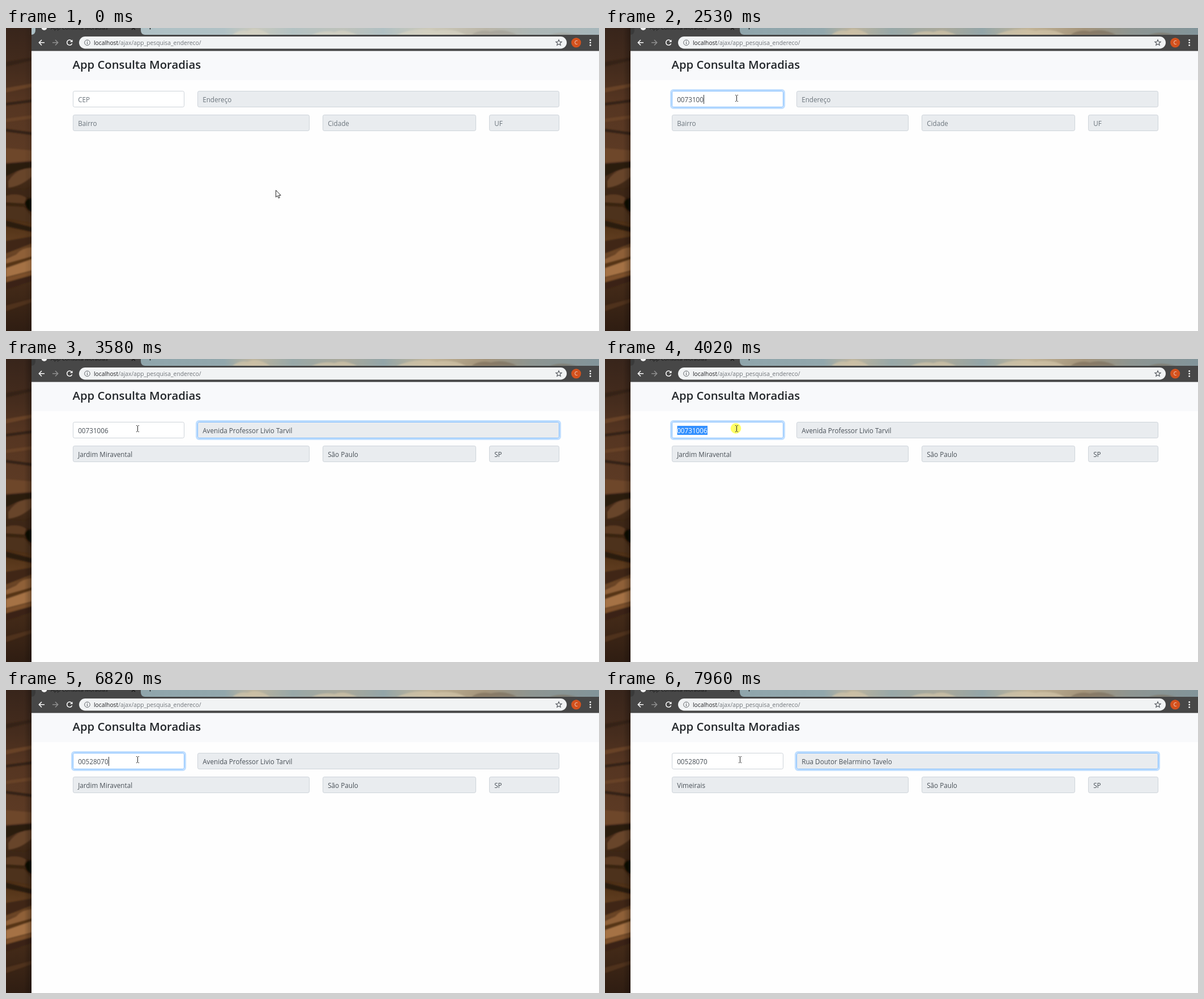
Animation of 1047x535 px, one loop 7990 ms. Source, as an HTML page:

```html
<!DOCTYPE html>
<html lang="pt-BR">
<head>
<meta charset="utf-8">
<title>App Consulta Moradias</title>
<style>
  html, body { margin: 0; width: 100%; height: 100%; overflow: hidden; background: #fefefe; }
  svg { display: block; width: 1047px; height: 535px; }
  text { font-family: "Open Sans", "Noto Sans", sans-serif; white-space: pre; }
  .field { font-size: 11.7px; fill: #495057; }
  .field.hint { fill: #6c757d; }
  .field.picked { fill: #fff; }
  .box { stroke-width: 1; }
  .ring { fill: none; stroke: #007bff; stroke-width: 3; }
</style>
</head>
<body>
<svg viewBox="0 0 1047 535">
  <defs>
    <linearGradient id="rock" x2="0" y2="1">
      <stop offset="0" stop-color="#38251b"/>
      <stop offset=".14" stop-color="#452c1d"/>
      <stop offset=".24" stop-color="#553521"/>
      <stop offset=".4" stop-color="#5c3a24"/>
      <stop offset=".48" stop-color="#4b2f1c"/>
      <stop offset=".57" stop-color="#35210f"/>
      <stop offset=".66" stop-color="#553519"/>
      <stop offset=".74" stop-color="#6b4526"/>
      <stop offset=".85" stop-color="#432a18"/>
      <stop offset="1" stop-color="#2f1d12"/>
    </linearGradient>
    <linearGradient id="sky">
      <stop offset="0" stop-color="#8ca3ab"/>
      <stop offset=".34" stop-color="#92a7ac"/>
      <stop offset=".39" stop-color="#bdb39c"/>
      <stop offset=".46" stop-color="#98a8a8"/>
      <stop offset=".55" stop-color="#aaa899"/>
      <stop offset=".62" stop-color="#93a5a8"/>
      <stop offset=".7" stop-color="#c2b497"/>
      <stop offset=".8" stop-color="#a3937a"/>
      <stop offset=".88" stop-color="#8e9591"/>
      <stop offset="1" stop-color="#82949a"/>
    </linearGradient>
    <linearGradient id="shade">
      <stop offset="0" stop-opacity="0"/>
      <stop offset="1" stop-opacity=".3"/>
    </linearGradient>
    <filter id="soft" x="-20%" width="140%"><feGaussianBlur stdDeviation="1.200"/></filter>
  </defs>

  <!-- desktop -->
  <rect width="46" height="535" fill="url(#rock)"/>
  <g filter="url(#soft)">
    <path d="M0 60L46 52V57L0 68ZM0 132L46 126V131L0 137ZM0 178L46 184V189L0 183Z" fill="#362216"/>
    <path d="M0 106L46 98V104L0 114ZM0 160L46 154V160L0 166Z" fill="#684228"/>
    <path d="M0 212L46 216V234L0 238Z" fill="#6e472b"/>
    <path d="M0 240L46 236V246L20 252L0 262Z" fill="#2c1a10"/>
    <path d="M4 270Q20 246 46 248V262Q26 280 4 282Z" fill="#67452c"/>
    <path d="M0 284L34 286L46 280V298L22 300L0 292Z" fill="#3c2516"/>
    <path d="M0 296Q22 290 36 300L32 310L0 308Z" fill="#5b3b23"/>
    <path d="M34 308Q38 300 46 302V324Q36 322 34 308Z" fill="#0c0705"/>
    <path d="M0 314L32 316L46 334V344L0 336Z" fill="#4d301b"/>
    <path d="M0 340L46 352V360L0 350Z" fill="#2b1a0e"/>
    <path d="M0 376L46 368V380L0 398Z" fill="#402815"/>
    <path d="M0 408L18 400Q28 388 46 387V404L0 416Z" fill="#8f6139"/>
    <path d="M0 416L46 403V408L0 423Z" fill="#573619"/>
    <path d="M0 424L46 408V428L0 440Z" fill="#a57244"/>
    <path d="M0 441L46 429V436L0 449Z" fill="#7b502b"/>
    <path d="M0 450L46 437V447L0 462Z" fill="#3a2413"/>
    <path d="M0 490L46 478V484L0 500Z" fill="#50331e"/>
  </g>
  <rect id="shadow" x="32" width="14" height="535" fill="url(#shade)"/>
  <rect x="45" width="1002" height="14" fill="url(#sky)"/>
  <g filter="url(#soft)">
    <path d="M400 12Q412 2 426 5Q446 -3 466 12ZM540 12Q560 3 580 7Q596 0 620 12ZM690 12Q720 -2 760 5Q790 0 812 12Z" fill="#d2c5a9" opacity=".7"/>
    <path d="M822 12Q836 2 856 6Q880 0 902 12ZM960 12Q980 5 1008 12Z" fill="#786b59" opacity=".6"/>
  </g>
  <rect id="pale" x="45" width="1002" height="14" fill="#dce8ec"/>

  <!-- browser -->
  <path id="corner" d="M45 0H54V12H45Z" fill="#3a3a3a"/>
  <path d="M45 12Q52 11 52 4V0H238V4Q238 11 245 12H1047V41H45Z" fill="#474747"/>
  <circle cx="67.500" cy="-1" r="5" fill="#f2f2f2"/>
  <text x="79" y="2.500" font-size="9.300" fill="#191919">App Consulta Moradias</text>
  <path d="M222 -3L228 3M228 -3L222 3M254.500 -3V2.500" stroke="#161616" stroke-width="1.400"/>
  <g fill="none" stroke="#fff" stroke-width="1.500">
    <path d="M68 25.800H58.500M63 21L58.300 25.800L63 30.600"/>
    <path d="M82 25.800H91.500M87 21L91.700 25.800L87 30.600" stroke="#8f8f8f"/>
    <path d="M116 23A4.600 4.600 0 1 0 116.600 27.200"/>
    <path d="M117.500 20.500V25H113Z" fill="#fff" stroke="none"/>
  </g>
  <rect x="129" y="15" width="861" height="21.500" rx="10.750" fill="#f1f3f4"/>
  <circle cx="143.500" cy="25.800" r="4.800" fill="none" stroke="#5f6368"/>
  <path d="M143.500 25V28.500M143.500 22.800V24" stroke="#5f6368" stroke-width="1.200"/>
  <text x="155" y="29.700" font-size="10.300" fill="#202124">localhost<tspan fill="#70757a">/ajax/app_pesquisa_endereco/</tspan></text>
  <path d="M976 20.700L977.400 24.100L981.100 24.400L978.300 26.800L979.200 30.400L976 28.500L972.800 30.400L973.700 26.800L970.900 24.400L974.600 24.100Z" fill="none" stroke="#50545a" stroke-width="1.100"/>
  <circle cx="1006.700" cy="25.800" r="8.600" fill="#d4521e"/>
  <text x="1006.700" y="29.200" font-size="9" fill="#f7e3da" text-anchor="middle">C</text>
  <g fill="#fff">
    <circle cx="1031.700" cy="21.400" r="1.400"/>
    <circle cx="1031.700" cy="25.900" r="1.400"/>
    <circle cx="1031.700" cy="30.400" r="1.400"/>
  </g>

  <!-- page -->
  <rect x="45" y="40" width="1002" height="495" fill="#fefefe"/>
  <rect x="45" y="40" width="1002" height="52" fill="#f8f9fb"/>
  <rect x="45" y="39.500" width="1002" height="1" fill="#3c3c3c"/>
  <text x="117.500" y="72" font-size="20.300" font-weight="600" fill="#212529">App Consulta Moradias</text>
  <g id="form"></g>
  <rect id="caret" y="118" width="1" height="16" fill="#30353a"/>
  <circle id="glow" r="9.300" fill="#ffff00" opacity=".6"/>
  <path id="arrow" d="M0 0V12.200L2.800 9.600L4.700 13.900L6.700 13L4.800 8.900H8.700Z" fill="#fff" stroke="#111" stroke-width=".9"/>
  <path id="beam" d="M-2.500 -5.500H-1M1 -5.500H2.500M0 -5V5M-2.500 5.500H-1M1 5.500H2.500" fill="none" stroke="#222"/>
</svg>

<script>
const LOOP = 7990, FADE = 150, BLINK = 530;
const FONT = 11.7, DIGIT = FONT * 0.572;
const $ = id => document.getElementById(id);

function add(tag, attrs) {
  const el = document.createElementNS("http://www.w3.org/2000/svg", tag);
  for (const k in attrs) el.setAttribute(k, attrs[k]);
  $("form").append(el);
  return el;
}
const show = (el, on) => el.setAttribute("visibility", on ? "visible" : "hidden");
const place = (el, x, y) => el.setAttribute("transform", `translate(${x} ${y})`);
const mix = (a, b, k) => `rgb(${a.map((v, i) => Math.round(v + (b[i] - v) * k))})`;
const smooth = k => k * k * (3 - 2 * k);

// Outer edges of the field; strokes are centred on half pixels.
function makeField(hint, left, right, top, fill) {
  const x = left + 0.5, y = top + 0.5, width = right - left - 1, height = 28;
  const ring = add("rect", { class: "ring", x: x - 2, y: y - 2, width: width + 4, height: height + 4, rx: 4.5 });
  const box = add("rect", { class: "box", x, y, width, height, rx: 2.7, fill });
  const mark = add("rect", { x: left + 9.5, y: 118, height: 16, fill: "#3390ff" });
  const label = add("text", { x: left + 9.2, y: top + 19.8 });
  return { hint, ring, box, mark, label };
}
const GREY = "#e9ecef";
const cep = makeField("CEP", 118, 315, 111, "#fff");
const street = makeField("Endereço", 338, 977, 111, GREY);
const area = makeField("Bairro", 118, 536, 153, GREY);
const city = makeField("Cidade", 559, 830, 153, GREY);
const state = makeField("UF", 853, 977, 153, GREY);

function draw(field, value, focus, picked) {
  const { ring, box, mark, label, hint } = field;
  ring.setAttribute("opacity", focus * 0.25);
  box.setAttribute("stroke", mix([206, 212, 218], [128, 189, 255], focus));
  label.textContent = value || hint;
  label.setAttribute("class", "field" + (value ? "" : " hint") + (picked ? " picked" : ""));
  show(mark, picked);
  if (picked) mark.setAttribute("width", label.getComputedTextLength());
}

// Each entry switches the focus on, then off, then on...
const cepFocus = [1050, 2970, 3840, 7020];
const streetFocus = [2970, 3840, 7020];
function focusLevel(t, switches) {
  const past = switches.filter(s => s <= t);
  if (!past.length) return 0;
  const eased = smooth(Math.min(1, (t - past[past.length - 1]) / FADE));
  return past.length % 2 ? eased : 1 - eased;
}

const entries = [
  { code: "00731006", keys: [1740, 1850, 1970, 2150, 2300, 2450, 2530, 2780] },
  { code: "00528070", keys: [4690, 5080, 5490, 5720, 5870, 6330, 6610, 6820] }
];
const results = [
  { at: 3110, values: ["Avenida Professor Livio Tarvil", "Jardim Miravental", "São Paulo", "SP"] },
  { at: 7310, values: ["Rua Doutor Belarmino Tavelo", "Vimeirais", "São Paulo", "SP"] }
];
const clicks = [[1050, 1150], [3840, 3920], [4010, 4090]];
const within = (t, a, b) => t >= a && t < b;
const latest = (list, t, at) => list.filter(e => at(e) <= t).pop();

// Small hand movements after the pointer has settled: time, x, y
const nudges = [
  [460, 232.5, 124], [3580, 232.5, 123], [7560, 231.5, 122],
  [7585, 233.5, 121], [7610, 234.5, 122], [7820, 231.5, 125],
  [7860, 229.5, 127], [7900, 233.5, 126], [7930, 236.5, 124], [7960, 238.5, 123]
];
function pointer(t) {
  if (t >= 460) return latest(nudges, t, n => n[0]).slice(1);
  const e = smooth(t / 460);
  return [476.5 - 244 * e, 286.5 - 162.5 * e];
}

function render(t) {
  const entry = latest(entries, t, e => e.keys[0]);
  const typed = entry ? entry.keys.filter(k => k <= t) : [];
  const found = latest(results, t, r => r.at);
  const values = found ? found.values : [];
  const cepPicked = within(t, 4010, 4690);

  draw(cep, entry ? entry.code.slice(0, typed.length) : "", focusLevel(t, cepFocus), cepPicked);
  draw(street, values[0], focusLevel(t, streetFocus), within(t, 7020, 7310));
  [area, city, state].forEach((f, i) => draw(f, values[i + 1], 0, false));

  const editing = within(t, 1050, 2970) || within(t, 3840, 7020);
  const last = Math.max(t < 3840 ? 1050 : 3840, ...typed);
  show($("caret"), editing && !cepPicked && Math.floor((t - last) / BLINK) % 2 === 0);
  $("caret").setAttribute("x", Math.round(127.2 + typed.length * DIGIT));

  const [x, y] = pointer(t);
  const overInput = within(x, 118, 315) && within(y, 111, 140);
  show($("arrow"), !overInput);
  show($("beam"), overInput);
  show($("glow"), clicks.some(c => within(t, ...c)));
  place($("arrow"), x, y);
  place($("beam"), x, y);
  place($("glow"), x - 1.5, y - 0.5);

  const active = t >= 1050;
  $("pale").setAttribute("opacity", active ? 0 : 0.4);
  show($("corner"), active);
  $("shadow").setAttribute("opacity", active ? 1 : 0.4);
}

const start = performance.now();
function tick(now) {
  render(Math.max(0, now - start) % LOOP);
  requestAnimationFrame(tick);
}
render(0);
requestAnimationFrame(tick);
</script>
</body>
</html>
```
